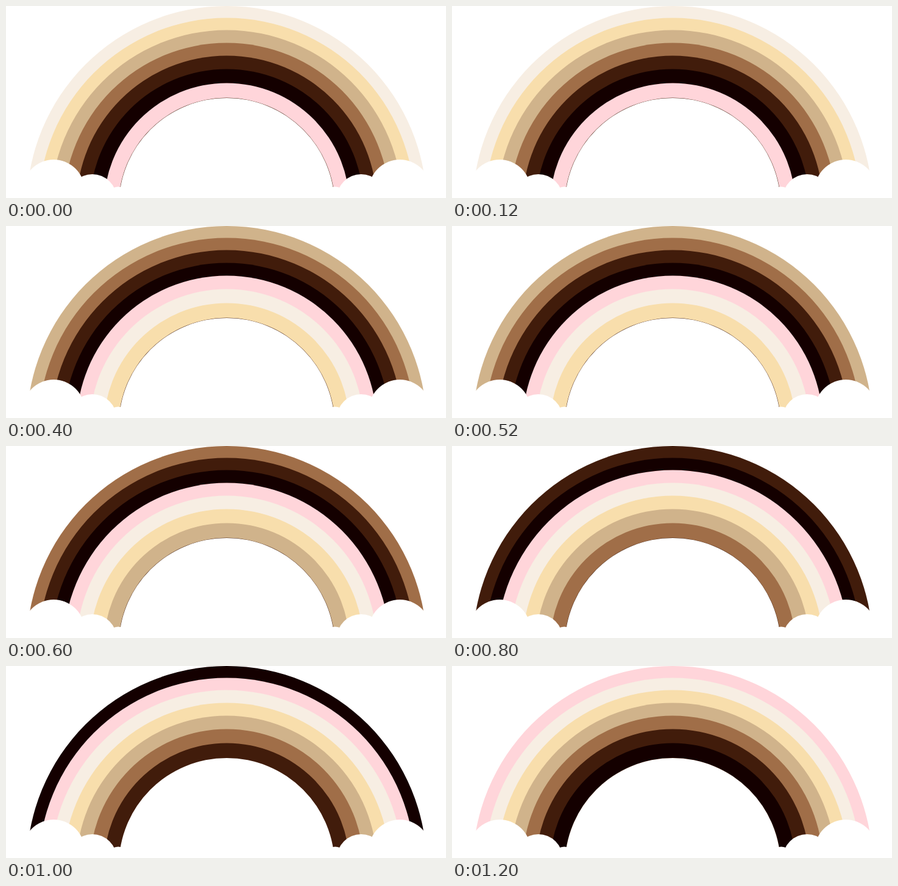
Animation, 722 px wide and 315 px high, one loop 1.4 s. Source, as an HTML page:

```html
<!DOCTYPE html>
<html lang="en">
<head>
<meta charset="utf-8">
<title>Rainbow</title>
<style>
  html, body { margin: 0; width: 100%; height: 100%; overflow: hidden; background: #fff; }
  svg { display: block; width: 100%; height: 100%; }
</style>
</head>
<body>
<svg id="stage" viewBox="0 0 722 315"></svg>
<script>
const COLORS = ['#f7eee3', '#f8deac', '#d0b38b', '#a06e48', '#411c0b', '#140000', '#ffd5da'];
const RADII = [328, 308.5, 288.5, 267.5, 246.5, 224.5, 201.5];
const CX = 362.2, CY = 328, STEP = 200;
const stage = document.getElementById('stage');

function circle(cx, cy, r, fill = '#fff') {
  const el = document.createElementNS('http://www.w3.org/2000/svg', 'circle');
  Object.entries({ cx, cy, r, fill }).forEach(([key, value]) => el.setAttribute(key, value));
  return stage.appendChild(el);
}

const bands = RADII.map(r => circle(CX, CY, r));

// Hollow centre with a hairline dark rim
circle(CX, CY, 177.5, '#411c0b');
circle(CX, CY, 177.1);

// Cloud puffs, mirrored at both ends
for (const [dx, y, r] of [[284, 303, 51], [220.5, 316, 40], [178, 316.5, 20]]) {
  circle(CX - dx, y, r);
  circle(CX + dx, y, r);
}

function draw(now) {
  const shift = Math.floor(now / STEP) % COLORS.length;
  bands.forEach((band, i) => band.setAttribute('fill', COLORS[(i + shift) % COLORS.length]));
}

let start;
function tick(now) {
  start ??= now;
  draw(now - start);
  requestAnimationFrame(tick);
}
draw(0);
requestAnimationFrame(tick);
</script>
</body>
</html>
```
